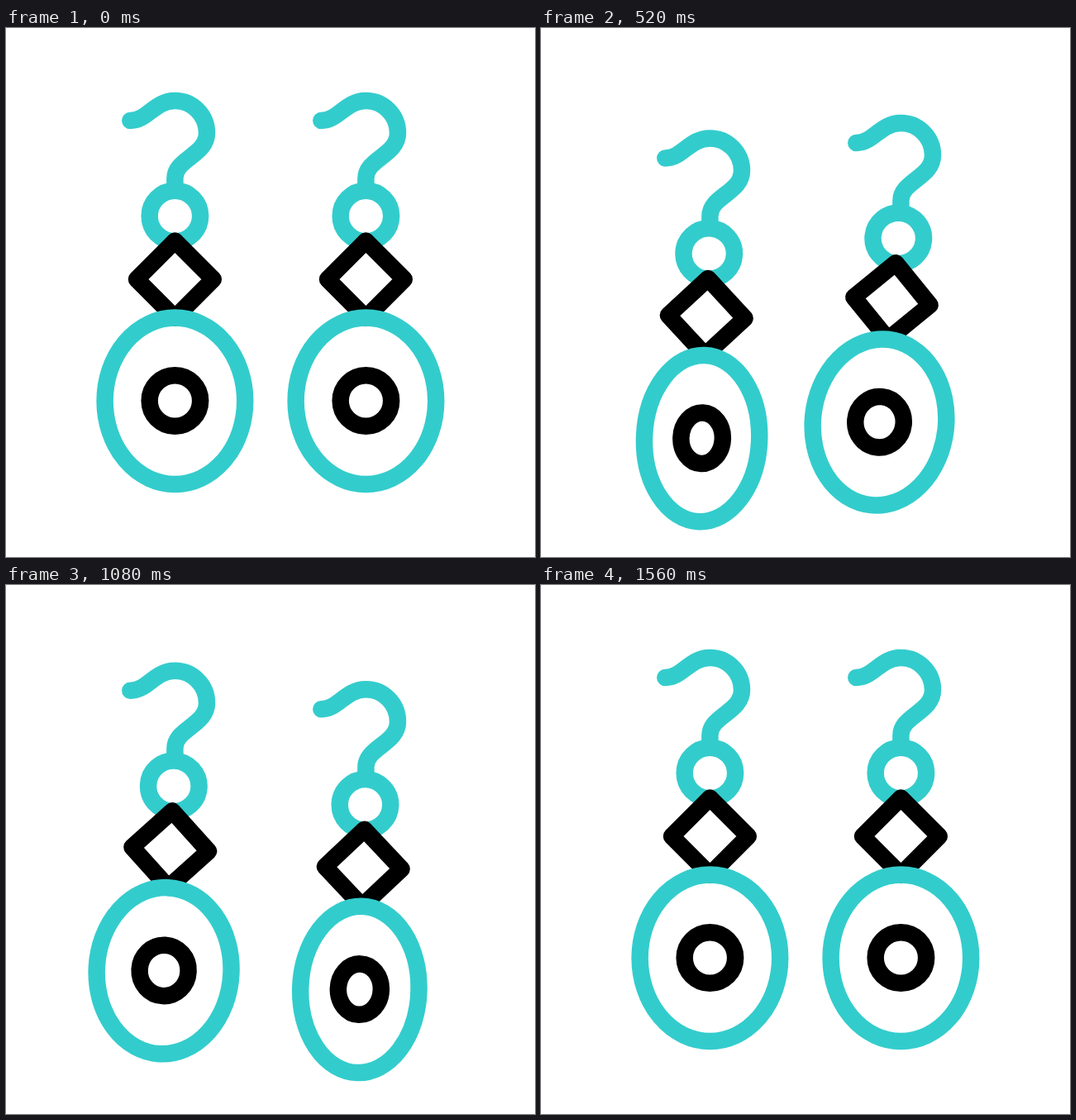
Animation, 640 px wide and 640 px high, one loop 1640 ms. Source, as an HTML page:

```html
<!DOCTYPE html>
<html lang="en">
<head>
<meta charset="utf-8">
<title>Earrings</title>
<style>
  html, body { margin: 0; width: 100%; height: 100%; overflow: hidden; background: #fff; }
  svg { display: block; width: 100vw; height: 100vh; }
  .earring { fill: none; stroke-width: 20.5; stroke-linecap: round; stroke-linejoin: round; }
  .teal { stroke: #33cccc; }
  .black { stroke: #000; }
</style>
</head>
<body>
<svg id="stage" viewBox="0 0 640 640"></svg>
<script>
  const LOOP = 1640, STEP = 40;

  // Each track: [time, value] keys, eased between neighbours
  const DROP = [[80, 0], [720, 54], [1320, 0]];
  const SWING = [[40, 0], [360, 6], [720, -4], [1080, 3], [1440, 0]];
  const WIDTH = [[240, 1], [720, 0.735], [1240, 1]];

  // Local origin is the point where the ring hangs on the hook
  const SHAPES = `
    <path class="teal" d="M-54.1-85C-33-85-25-109 0-109C21.3-109 38.6-91.5 38.6-70C38.6-43 0-39 0-15V-5"/>
    <g class="swing">
      <circle class="teal" cy="30.6" r="30.75"/>
      <path class="black" d="M0 60.6L46.4 107L0 153.4L-46.4 107Z"/>
      <ellipse class="teal" cy="254.3" rx="84.8" ry="100.7"/>
      <ellipse class="black" cy="254" rx="30.75" ry="30.75"/>
    </g>`;

  // Cubic Bezier ease (0.55, 0, 0.45, 1), solved by bisection
  function ease(x) {
    const a = 0.55;
    let lo = 0, hi = 1;
    for (let i = 0; i < 24; i++) {
      const s = (lo + hi) / 2, r = 1 - s;
      if (3 * a * s * r * r + 3 * (1 - a) * s * s * r + s * s * s < x) lo = s;
      else hi = s;
    }
    return lo * lo * (3 - 2 * lo);
  }

  function sample(keys, t) {
    if (t <= keys[0][0]) return keys[0][1];
    for (let i = 1; i < keys.length; i++) {
      const [t0, v0] = keys[i - 1], [t1, v1] = keys[i];
      if (t < t1) return v0 + (v1 - v0) * ease((t - t0) / (t1 - t0));
    }
    return keys[keys.length - 1][1];
  }

  const stage = document.getElementById("stage");

  function makeEarring(x, delay) {
    const g = document.createElementNS("http://www.w3.org/2000/svg", "g");
    g.setAttribute("class", "earring");
    g.innerHTML = SHAPES;
    stage.append(g);
    const swing = g.querySelector(".swing");
    const [drop, bead] = g.querySelectorAll("ellipse");
    return time => {
      const t = time - delay, w = sample(WIDTH, t);
      g.setAttribute("transform", `translate(${x} ${197 + sample(DROP, t)})`);
      swing.setAttribute("transform", `rotate(${sample(SWING, t)})`);
      drop.setAttribute("rx", 84.8 * w);
      bead.setAttribute("rx", 30.75 * w);
    };
  }

  const earrings = [makeEarring(204.4, 0), makeEarring(435.4, 120)];

  function draw() {
    const t = Math.floor((performance.now() % LOOP) / STEP) * STEP;
    earrings.forEach(pose => pose(t));
    requestAnimationFrame(draw);
  }
  draw();
</script>
</body>
</html>
```
